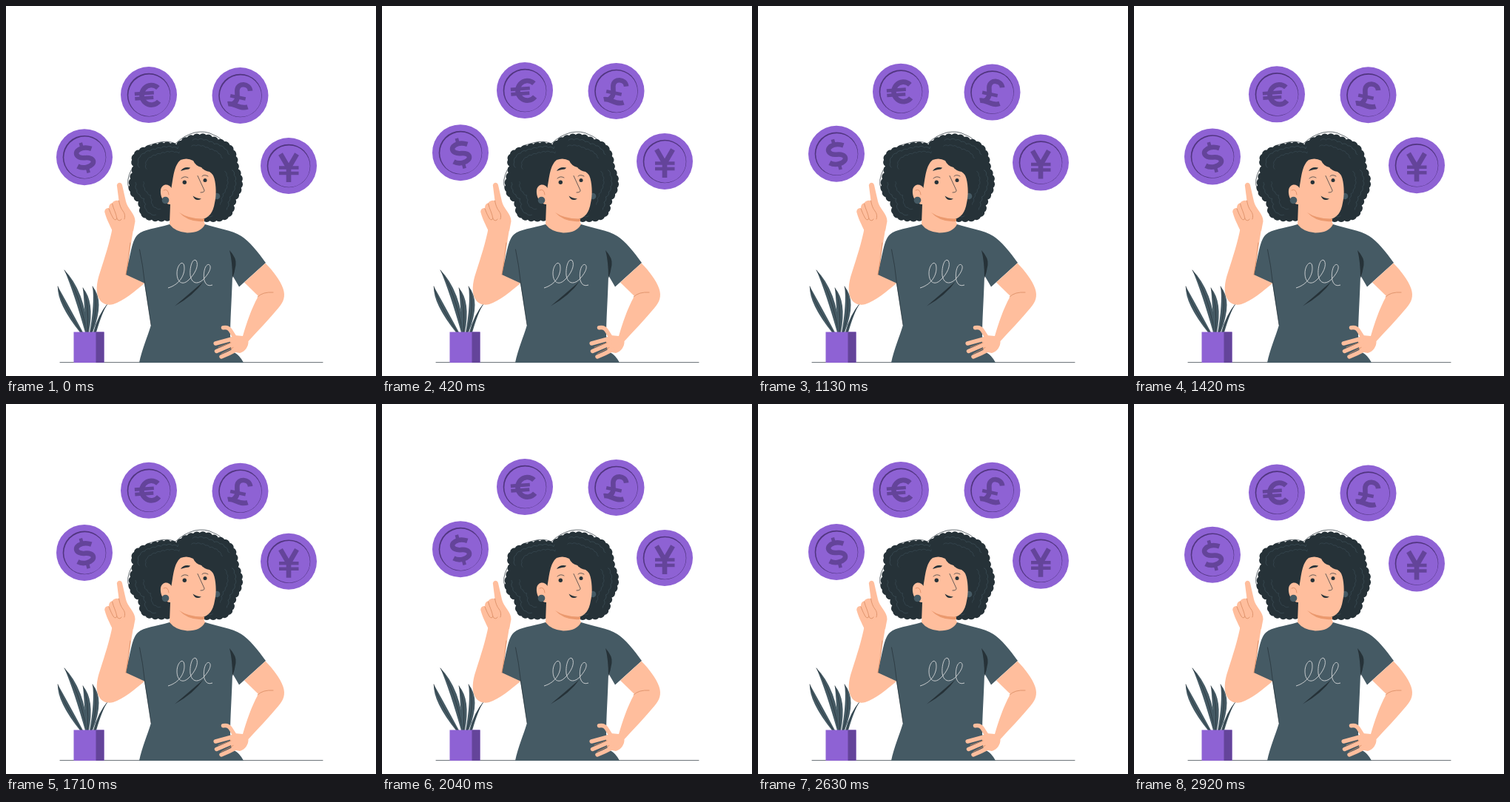
An HTML page for the animation above (2960 ms loop, 500 by 500 pixels).

```html
<!DOCTYPE html>
<html lang="en">
<head>
<meta charset="utf-8">
<title>Floating coins</title>
<style>
html, body { margin: 0; width: 100%; height: 100%; overflow: hidden; background: #fff; }
svg { display: block; width: 100vw; height: 100vh; }
.skin { fill: #ffbe9d; }
.fingers { fill: none; stroke: #ffbe9d; stroke-width: 5.5; stroke-linecap: round; }
.crease { fill: none; stroke: #d98b63; stroke-width: .8; stroke-linecap: round; }
.shirt { fill: #455a64; }
.dark { fill: #263238; }
.thin { fill: none; stroke: #263238; stroke-width: .7; stroke-linecap: round; }
.strand { fill: none; stroke: #455a64; stroke-width: .6; stroke-dasharray: 70 25; }
.sign { fill: none; stroke: #64449a; stroke-width: 6.6; }
.bar { stroke-width: 4.6; }
</style>
</head>
<body>
<svg viewBox="0 0 500 500">
  <path class="thin" d="M73 481.6H428"/>

  <g id="plant"></g>
  <path fill="#8e62d4" d="M91.5 440.5H132.5V482H91.5Z"/>
  <path fill="#64449a" d="M121.5 440.5H132.5V482H121.5Z"/>

  <!-- hair -->
  <path id="hair" class="dark" d="M173 200C177 194 190 190 204 187Q218 183 230 188C240 177 254 173 266 174C278 174 284 181 292 182C302 185 308 192 311 204C313 214 312 219 317 228C321 240 317 252 311 261C306 266 309 274 305 281C298 290 286 291 270 290L222 288C210 292 192 289 185 285C179 279 183 272 180 265C171 258 166 252 167 242C167 232 173 224 172 214C169 208 170 204 173 200Z"/>
  <g id="strands"></g>
  <path class="thin" d="M166 246Q162 236 169 222M182 194Q192 187 204 185Q218 181 229 186Q240 175 255 171Q270 168 280 174Q292 178 298 190"/>
  <circle class="shirt" cx="285" cy="257" r="4.3"/>

  <!-- raised arm and hand -->
  <path class="skin" d="M144 299C140 320 134 338 127 360C122 374 121 388 126 396C130 403 138 405 145 403C158 399 175 385 188 374L180 340L165 345L172.5 299Z"/>
  <path class="skin" d="M149.800 242Q150.500 239 153 238.700Q156 238.700 157 242L162 264C164 274 175 281 174.500 291L172 304H144C140 296 135 286 133.200 278Q133.500 273 139 273Q139 267 143.500 266.500Q146 262 152.500 263Z"/>
  <path class="crease" d="M143.500 267C145 274 149 280 150 288Q154 292 156 288M139 274Q142 282 145 287Q148 291 150 287M152.500 263Q154 272 158 277Q162 282 160 288"/>

  <!-- shirt -->
  <path class="shirt" d="M221 295C202 301 187 301 178 309C170 317 169 332 162 363L187 374.500L196 431C191 448 184 463 180 482H321C318 476 313 470 308 468L303 446C303 425 305 397 306 364L315 379.500L351 347C341 333 328 317 318 311C306 303 284 300 269 295Z"/>
  <path class="thin" d="M180.500 329Q185 350 187.500 374.500L196 431"/>
  <path class="dark" d="M302 330Q312 341 310.500 350Q309 360 306 368Q306 345 302 330ZM228 405.500Q250 387 267 372Q254 391 228 405.500Z"/>
  <path class="crease" d="M162 363Q166 342 168 320"/>
  <path fill="none" stroke="#e6e6e6" stroke-width=".8" d="M219 381C236 376 243 361 240.500 350C238 343 231 351 231 361C231 373 238 378 246 371C256 362 261 350 257 344C252 340 248 353 249 364C251 376 260 377 268 368C276 359 278 352 274.500 349.500C269 348 266 361 268 371Q271 380 279 377"/>

  <!-- arm on hip -->
  <path class="skin" d="M322 373.500L350.500 347.500C360 357 371 371 374.500 382C378 392 375 400 369 407C356 423 341 438 327.500 453C328 460 323 467 316 469L305 467L302 449L309 445L320 446C325 429 331 410 341 392Z"/>
  <path class="fingers" d="M293.500 434.800Q300 433.500 303 438L310 449M283.200 456L307 449.500M284.500 466.500L308 456.500M291 474Q301 470 312 464"/>
  <path class="crease" d="M340 393Q347 386 361 387M287 461L304 455M291 470L307 461.500"/>

  <!-- face -->
  <path class="skin" d="M221 295L222 268C214 268 208 258 209 249C210 240 220 239 223.500 246C226 232 227 215 236 208Q245 204.500 253 209Q256 216 264 218Q268 223 275 224Q280 227 281.500 233C284 242 284.500 256 282 266C280 279 274 286 266 288L269 295Q263 306.500 245 306.500Q229 305.500 221 295Z"/>
  <path fill="#eb996e" d="M234 279Q247 288 268 287.500V291Q247 293 234 279Z"/>
  <path class="crease" d="M213 249Q219 246 220 255"/>
  <circle class="shirt" cx="215.5" cy="262.5" r="4.8"/>
  <circle class="dark" cx="241.3" cy="238.3" r="2.7"/>
  <circle class="dark" cx="269" cy="235.5" r="2.5"/>
  <path class="thin" d="M237 233Q241 229 246 232M265 230Q268 227 273 230"/>
  <path class="dark" d="M236 223Q240 216.500 249 218.500Q248 221 243 221Q239 222 236 223ZM265 219.500Q270 216 275 222.500Q270 220 265 219.500Z"/>
  <path class="thin" d="M259 229.500L268 249Q268.500 252 263 252"/>
  <path class="dark" d="M252.500 256.500Q257 260 264 260.500Q256 265 252.500 256.500Z"/>

  <g id="coins"></g>
</svg>
<script>
const $ = id => document.getElementById(id);

// Turn the smooth hair outline into even curls, then echo it inward as strands
const hair = $("hair"), curls = 52, length = hair.getTotalLength();
const arcs = Array.from({ length: curls + 1 }, (_, i) => {
  const { x, y } = hair.getPointAtLength(length * i / curls);
  return (i ? "A6 6 0 0 1 " : "M") + x.toFixed(1) + " " + y.toFixed(1);
}).join("");
hair.setAttribute("d", arcs + "Z");
$("strands").innerHTML = [.88, .74].map(s =>
  `<path class="strand" d="${arcs}" transform="translate(243 232) scale(${s}) translate(-243 -232)"/>`).join("");

// Leaf from the pot to a tip, bending towards x = bend
const leaf = (base, x, y, bend, width) => {
  const bendY = y + (440 - y) * .35;
  const edge = k => `Q${bend + k * width} ${bendY - k * 2} `;
  return `<path class="shirt" d="M${base - 2} 441${edge(-1)}${x} ${y}${edge(1)}${base + 2} 441Z"/>
    <path class="thin" d="M${base} 441${edge(0)}${x} ${y}"/>`;
};
$("plant").innerHTML =
  leaf(102, 70, 379, 75, 6) + leaf(109, 79, 357, 99, 7) + leaf(110, 104, 381, 113, 7) +
  leaf(115, 117, 379, 127, 7) + leaf(120, 137.5, 402, 127, 3);

const coin = (x, y, tilt, sign, bars) => `<g transform="translate(${x} ${y})">
  <circle r="38" fill="#8e62d4"/>
  <circle r="29.3" fill="#513580"/>
  <circle cx=".5" cy=".6" r="28.2" fill="#8e62d4"/>
  <g class="sign" transform="rotate(${tilt})"><path d="${sign}"/><path class="bar" d="${bars}"/></g></g>`;
$("coins").innerHTML =
  coin(106, 204.2, -15, "M12 -8.5Q6 -12.5 0 -12.5C-13 -12 -12 -1 0 1C14 3 13 14 0 14Q-7 14 -12 9.5", "M0 -20V-12M0 13V22") +
  coin(193, 120.1, -4, "M13 -8.5A13 13.3 0 1 0 13 9.5", "M-19 -2.5H7M-19 4H6") +
  coin(316.5, 121, 12, "M12 -9C9 -19 -7 -17 -5.500 -6C-4 2 0 8 -9 14.500M-14 14.500C-6 11 3 19 13 13", "M-13 3H8") +
  coin(382, 216, 0, "M-11 -16L0 3L11 -16M0 1V22", "M-13 2.5H13.5M-13 10H13.5");

// Linear bob, rising slightly faster than it falls
const period = 1480, peak = .47, rise = 10;
const start = performance.now();
function draw(now) {
  const p = Math.max(0, now - start) % period / period;
  const lift = rise * Math.min(p / peak, (1 - p) / (1 - peak));
  $("coins").setAttribute("transform", `translate(0 ${-lift})`);
  requestAnimationFrame(draw);
}
draw(start);
</script>
</body>
</html>
```
